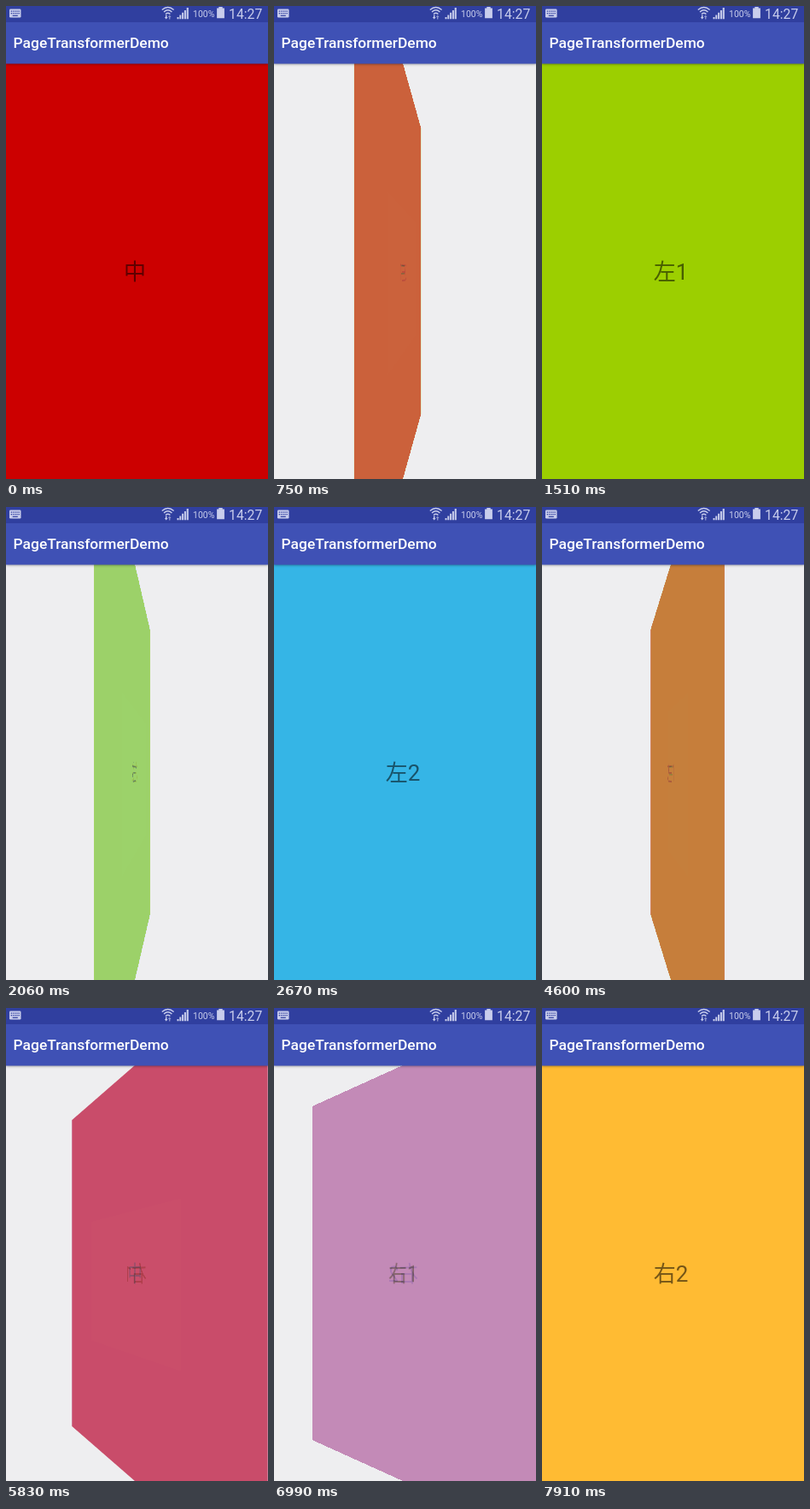
An HTML page that plays this animation: 307x553 px, repeating every 8.06 s.

```html
<!DOCTYPE html>
<html lang="zh-CN">
<head>
<meta charset="utf-8">
<title>PageTransformerDemo</title>
<style>
  html, body { margin: 0; width: 100%; height: 100%; overflow: hidden; background: #eeeef0; }
  #pager {
    position: absolute; left: -5px; top: 67px; width: 312px; height: 486px;
    overflow: hidden; perspective: 335px;
  }
  .page { position: absolute; left: 0; top: 0; width: 312px; height: 486px; }
  .page text {
    font: 26px Roboto, "Noto Sans CJK SC", "Noto Sans CJK", "Noto Sans CJK JP", sans-serif;
    text-anchor: middle; fill: rgba(0, 0, 0, .54);
  }
  #bar {
    position: absolute; left: 0; top: 0; width: 307px; height: 67px; overflow: visible;
    background: #3f51b5; box-shadow: 0 1px 3px rgba(0, 0, 0, .4);
  }
  #bar text { font-family: Roboto, sans-serif; }
</style>
</head>
<body>
<div id="pager"></div>
<svg id="bar" viewBox="0 0 307 67">
  <rect width="307" height="67.5" fill="#3f51b5"/>
  <rect width="307" height="19" fill="#303f9f"/>
  <g fill="#c8cdec">
    <!-- keyboard -->
    <rect x="4" y="3.5" width="13.5" height="10" rx="1.3"/>
    <path d="M5.7 6.2H16M5.7 8.6H16" stroke="#303f9f" stroke-width="1.2" stroke-dasharray="1.3 .9"/>
    <path d="M7.7 11.3H13.8" stroke="#303f9f" stroke-width="1.2"/>
    <!-- wifi -->
    <g fill="none" stroke="#c8cdec" stroke-width="1.4">
      <path d="M182.8 4.6Q189.7 -1.8 196.6 4.6M185 7.1Q189.7 2.6 194.4 7.1M187 9.5Q189.7 7 192.4 9.5"/>
    </g>
    <path d="M187 10.5h1.4v2.6h1.2l-1.9 2.4l-1.9 -2.4h1.2z"/>
    <path d="M191 15.5h1.4v-2.6h1.2l-1.9 -2.4l-1.9 2.4h1.2z" opacity=".6"/>
    <!-- signal -->
    <path d="M200.5 13h2v2.3h-2zM203.3 10.6h2v4.7h-2zM206.1 7.8h2v7.5h-2zM208.9 5h2v10.3h-2zM211.7 2h2.1v13.3h-2.1z"/>
    <text x="219" y="13" font-size="10.5">100%</text>
    <!-- battery -->
    <path d="M249.3 1h4.4v1.4h2.2v11.8h-8.8V2.4h2.2z"/>
    <text x="261" y="15" font-size="15.8">14:27</text>
  </g>
  <text x="8.6" y="49" font-size="17.4" font-weight="500" fill="#fff">PageTransformerDemo</text>
</svg>
<script>
const LOOP = 8060, STEP = 76.7, SETTLE = 600;

const pages = [
  ['左2', '#35b5e6'], ['左1', '#9ccf00'], ['中', '#cc0000'],
  ['右1', '#aa66cc'], ['右2', '#ffbb33']
];
const pager = document.getElementById('pager');
pager.innerHTML = pages.map(([label, color]) =>
  `<svg class="page"><rect width="312" height="486" fill="${color}"/><text x="156" y="253">${label}</text></svg>`
).join('');
const views = [...pager.children];

// Each swipe: finger drag up to the release point, then a quintic settle.
const swipes = [
  { start: 510,  from: 2, to: 1, steps: 10, release: 417, dragged: .65, power: 1.3 },
  { start: 1750, from: 1, to: 0, steps: 12, release: 571, dragged: .75, power: 1.3 },
  { start: 3060, from: 0, to: 1, steps: 11, release: 494, dragged: .737, power: 1.4 },
  { start: 4290, from: 1, to: 2, steps: 12, release: 571, dragged: .75, power: 1.4 },
  { start: 5670, from: 2, to: 3, steps: 12, release: 571, dragged: .75, power: 1.09 },
  { start: 6920, from: 3, to: 4, steps: 10, release: 417, dragged: .65, power: 1.3 }
];

function progress(swipe, time) {
  const step = Math.floor((time - swipe.start + 8) / STEP);
  if (step >= swipe.steps) return 1;
  const elapsed = (step + 1) * STEP;
  if (elapsed < swipe.release) return swipe.dragged * (elapsed / swipe.release) ** swipe.power;
  const left = 1 - (elapsed - swipe.release) / SETTLE;
  return 1 - (1 - swipe.dragged) * left ** 5;
}

function scrollAt(time) {
  const swipe = swipes.filter(s => time >= s.start).pop();
  return swipe ? swipe.from + (swipe.to - swipe.from) * progress(swipe, time) : 2;
}

function draw(now) {
  const scroll = scrollAt(now % LOOP);
  views.forEach((view, i) => {
    const position = i - scroll;
    const alpha = 1 - Math.abs(position);
    view.style.visibility = alpha > 0 ? 'visible' : 'hidden';
    view.style.opacity = Math.max(0, alpha);
    view.style.transform = position ? `rotateY(${180 * position}deg)` : 'none';
  });
}

let origin;
function frame(now) {
  origin ??= now;
  draw(now - origin);
  requestAnimationFrame(frame);
}
draw(0);
requestAnimationFrame(frame);
</script>
</body>
</html>
```
